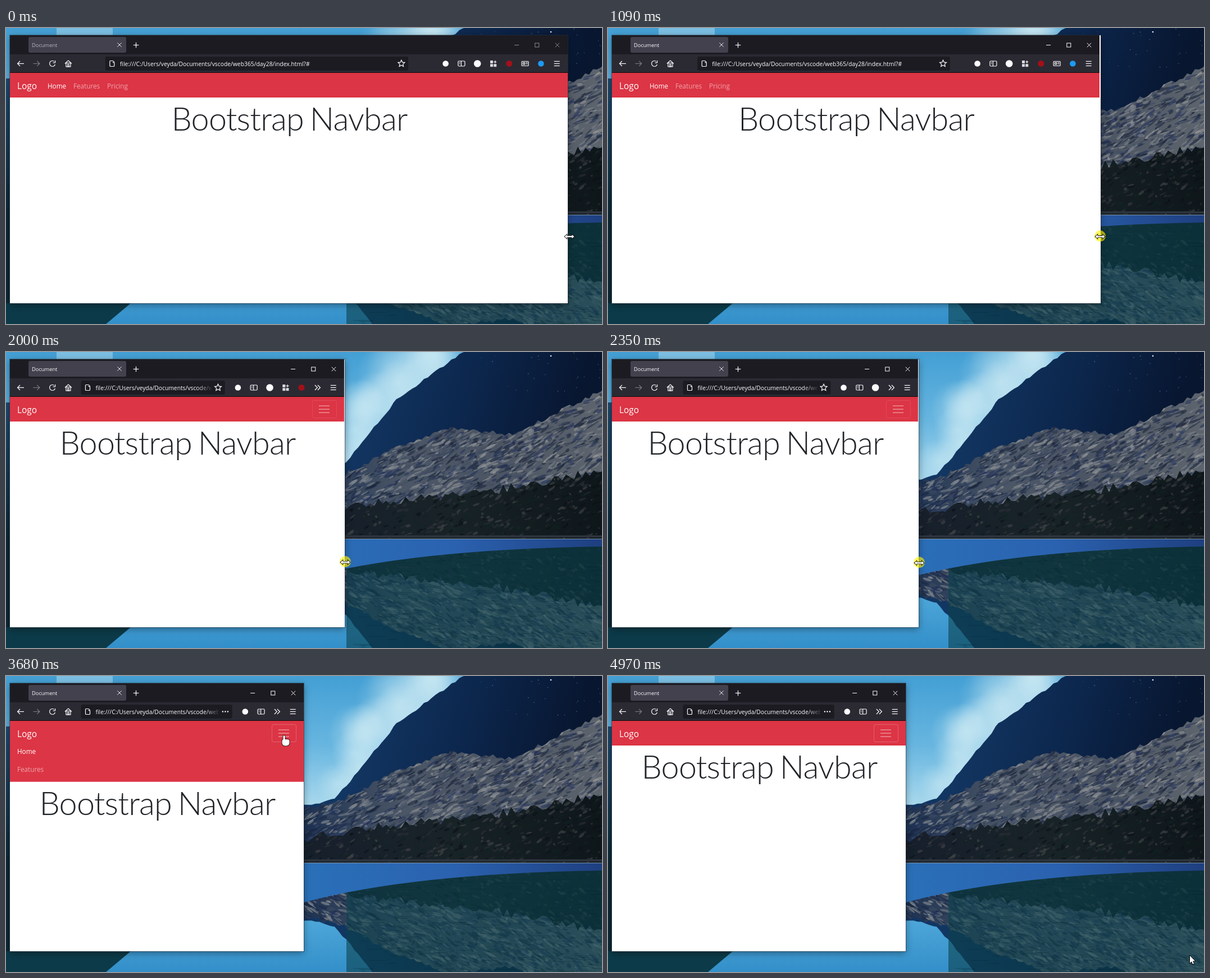
Write an HTML page with a canvas that moves like this. It is 1061 px wide and 528 px high and loops after 5.04 s.

```html
<!DOCTYPE html>
<html lang="en">
<head>
<meta charset="utf-8">
<title>Responsive navbar</title>
<style>
  html, body { margin: 0; width: 100%; height: 100%; overflow: hidden; background: #0b3340; }
  canvas { display: block; }
</style>
</head>
<body>
<canvas id="stage" width="1061" height="528"></canvas>
<script>
const W = 1061, H = 528, LOOP = 5040;
const LEFT = 7, TOP = 13, BOTTOM = 491, SHORE = 333, SLOT = 28.3;
const SANS = '"Open Sans", "Noto Sans", sans-serif';
const INK = '#fbfbfe';
const URL_TEXT = 'file:///C:/Users/veyda/Documents/vscode/web365/day28/index.html?#';
const stage = document.getElementById('stage').getContext('2d');
let g = stage;

// Drawing helpers
function rect(x, y, w, h, fill) { g.fillStyle = fill; g.fillRect(x, y, w, h); }
function line(x0, y0, x1, y1) { g.beginPath(); g.moveTo(x0, y0); g.lineTo(x1, y1); g.stroke(); }
function rows(x0, x1, ...ys) { for (const y of ys) line(x0, y, x1, y); }
function disc(x, y, r, fill) {
  g.beginPath(); g.arc(x, y, r, 0, 7); g.fillStyle = fill; g.fill();
}
function rounded(x, y, w, h, r, fill) {
  g.beginPath();
  g.roundRect(x, y, w, h, r);
  if (fill) { g.fillStyle = fill; g.fill(); } else g.stroke();
}
function chevron(x, dir, size = 4.5) {
  g.beginPath();
  g.moveTo(x - dir * size, -size);
  g.lineTo(x, 0);
  g.lineTo(x - dir * size, size);
  g.stroke();
}
function text(str, x, y, size, fill) {
  g.font = `${size}px ${SANS}`;
  g.textAlign = 'left';
  g.fillStyle = fill;
  g.fillText(str, x, y);
}
function blend(x0, y0, x1, y1, ...colors) {
  const grad = g.createLinearGradient(x0, y0, x1, y1);
  colors.forEach((c, i) => grad.addColorStop(i / (colors.length - 1), c));
  return grad;
}
function seeded(seed) {
  return () => (seed = (seed * 16807) % 2147483647) / 2147483647;
}
function clipped(path, paint) {
  g.save();
  g.clip(path);
  paint();
  g.restore();
}
function box(x, y, w, h) {
  const path = new Path2D();
  path.rect(x, y, w, h);
  return path;
}

// Wallpaper: a ragged ridge through a few key points, closed at the shore
function ridge(points, rough, rnd) {
  const path = new Path2D();
  path.moveTo(points[0][0], SHORE);
  for (let i = 0; i < points.length - 1; i++) {
    const [x0, y0] = points[i], [x1, y1] = points[i + 1];
    for (let x = x0; x < x1; x += 7) {
      path.lineTo(x, y0 + (y1 - y0) * (x - x0) / (x1 - x0) + (rnd() - 0.5) * rough);
    }
  }
  path.lineTo(W, points[points.length - 1][1]);
  path.lineTo(W, SHORE);
  return path;
}
function speckle(path, count, length, colors, rnd) {
  clipped(path, () => {
    g.globalAlpha = 0.55;
    for (let i = 0; i < count; i++) {
      g.beginPath();
      g.ellipse(530 + rnd() * 531, 60 + rnd() * 273, length * (0.2 + rnd()), 0.6 + rnd() * 2.2,
        -0.2 - rnd() * 0.6, 0, 7);
      g.fillStyle = colors[Math.floor(rnd() * colors.length)];
      g.fill();
    }
  });
}
function paintLand() {
  const rnd = seeded(71);
  g.fillStyle = blend(640, 60, 1000, 160, '#123662', '#0c264c', '#081630');
  g.fill(ridge([[530, 232], [585, 220], [695, 86], [812, 0], [W, -20]], 5, rnd));

  const slope = ridge([[530, 236], [596, 222], [705, 165], [790, 136], [905, 147], [W, 68]], 8, rnd);
  g.fillStyle = blend(530, 0, W, 0, '#1d3252', '#4b5666', '#4c5563', '#5d646d');
  g.fill(slope);
  speckle(slope, 3200, 10, ['#172238', '#1b2740', '#3f4b62', '#7d848c', '#9a9c9c', '#22305c'], rnd);

  const forest = ridge([[530, 290], [690, 265], [850, 250], [W, 212]], 16, rnd);
  g.fillStyle = blend(530, 0, W, 0, '#171f2c', '#182327', '#0e161a');
  g.fill(forest);
  speckle(forest, 1500, 6, ['#0a1016', '#16262a', '#2e3139', '#10241f', '#484a4c'], rnd);
  rect(530, SHORE - 6, W, 4, '#2c333c');
}
function paintWallpaper() {
  rect(0, 0, W, H, blend(0, 0, 0, 250, '#439fd4', '#68b6e0', '#b5dfef'));
  const rnd = seeded(12);
  for (let i = 0; i < 24; i++) {
    const x = 590 + rnd() * 190, y = 205 - (x - 560) * 0.75 + (rnd() - 0.5) * 130, r = 35 + rnd() * 50;
    const puff = g.createRadialGradient(x, y, 0, x, y, r);
    puff.addColorStop(0, 'rgba(208,236,244,.5)');
    puff.addColorStop(1, 'rgba(208,236,244,0)');
    rect(x - r, y - r, 2 * r, 2 * r, puff);
  }
  rect(90, 0, 100, 13, 'rgba(190,228,243,.45)');
  paintLand();
  for (let i = 0; i < 26; i++) disc(835 + rnd() * 226, rnd() * 70, 0.4 + rnd() * 0.4, 'rgba(165,190,230,.6)');
  disc(970, 7, 1.3, '#e5f4ff');
  rect(0, 90, 8, H, blend(0, 90, 0, SHORE, '#1d4a70', '#0c2835'));

  // The lake mirrors the land, tinted teal
  clipped(box(0, SHORE, W, H), () => {
    rect(8, SHORE, W, H, blend(0, SHORE, 0, H, '#2c6cb8', '#4fa8da', '#338fc9'));
    g.save();
    g.translate(0, 2 * SHORE);
    g.scale(1, -1);
    paintLand();
    g.restore();
    rect(606, SHORE, W, H, 'rgba(10,66,78,.6)');
    for (let i = 0; i < 260; i++) {
      rect(600 + rnd() * 461, 360 + rnd() * 168, 5 + rnd() * 30, 1, 'rgba(8,40,56,.35)');
    }
    g.fillStyle = blend(530, 0, W, 0, '#2a70b8', '#2b62b0', '#1e3f80');
    g.beginPath();
    g.moveTo(530, SHORE);
    g.lineTo(W, SHORE);
    g.lineTo(W, SHORE + 14);
    g.quadraticCurveTo(720, 352, 530, 404);
    g.fill();
    rect(530, SHORE - 1, W, 2, '#8095a4');
  });
  g.fillStyle = '#0c3a48';
  g.beginPath();
  g.moveTo(0, BOTTOM);
  g.lineTo(222, BOTTOM);
  g.lineTo(178, H);
  g.lineTo(0, H);
  g.fill();
}
const wallpaper = document.createElement('canvas');
wallpaper.width = W;
wallpaper.height = H;
g = wallpaper.getContext('2d');
paintWallpaper();
g = stage;

// Motion
const clamp = v => Math.min(1, Math.max(0, v));
const DRAG = [[400, 1000], [1090, 877], [1650, 676], [2350, 553], [2770, 530]];

// Smooth curve through the drag points, at rest on both ends
function edgeAt(t) {
  const last = DRAG.length - 1;
  const slope = i => i <= 0 || i >= last ? 0
    : (DRAG[i + 1][1] - DRAG[i - 1][1]) / (DRAG[i + 1][0] - DRAG[i - 1][0]);
  let i = 0;
  while (i < last - 1 && t >= DRAG[i + 1][0]) i++;
  const [t0, a] = DRAG[i], [t1, b] = DRAG[i + 1], span = t1 - t0, k = clamp((t - t0) / span);
  return a + (b - a) * k * k * (3 - 2 * k)
    + span * k * (1 - k) * (slope(i) * (1 - k) - slope(i + 1) * k);
}
// Decelerating hand movement with a slight sideways bow
function glide(k, x0, y0, x1, y1, bow) {
  const p = 1 - (1 - k) ** 2.3;
  return [x0 + (x1 - x0) * p + bow * Math.sin(Math.PI * k), y0 + (y1 - y0) * p];
}
function pointerAt(t, edge, lag) {
  if (t < 2770) return [edge + 3 - 2 * lag, 372 + 5 * ((1000 - edge) / 470) ** 3];
  if (t < 4500) return glide(clamp((t - 2770) / 560), 533, 377, 495, 106, -13);
  return glide(clamp((t - 4500) / 470), 495, 106, 1036, 499, 20);
}
// CSS "ease" timing
function ease(x) {
  const bez = (a, b, u) => 3 * a * u * (1 - u) ** 2 + 3 * b * u * u * (1 - u) + u ** 3;
  let lo = 0, hi = 1;
  for (let i = 0; i < 20; i++) {
    const mid = (lo + hi) / 2;
    if (bez(0.25, 0.25, mid) < clamp(x)) lo = mid; else hi = mid;
  }
  return bez(0.1, 1, lo);
}
// The picture advances every 70 ms; the second click shifts the beat
function tick(t) {
  const phase = t < 4480 ? 40 : 0;
  return phase + 70 * Math.floor((t - phase) / 70);
}

// Toolbar icons, centred on the origin
const icons = {
  back() { rows(-5, 6, 0); chevron(-5.5, -1); },
  forward() { rows(-6, 5, 0); chevron(5.5, 1); },
  reload() {
    g.beginPath(); g.arc(0, 0, 5, 0.3, 5.4); g.stroke();
    line(5, -5.5, 5, -1.5); line(5, -1.5, 1, -1.5);
  },
  home() {
    line(-6, 0, 0, -5.5); line(0, -5.5, 6, 0);
    g.strokeRect(-4, -1, 8, 6.5); g.strokeRect(-1.2, 1.5, 2.4, 4);
  },
  page() { rounded(-4, -5, 8, 10, [1, 4, 1, 1]); rows(1, 4, -2); },
  star() {
    g.beginPath();
    for (let i = 0; i < 10; i++) {
      const r = i % 2 ? 3 : 6.3, a = i * Math.PI / 5;
      g.lineTo(r * Math.sin(a), -r * Math.cos(a));
    }
    g.closePath(); g.stroke();
  },
  dots() { for (const x of [-4.5, 0, 4.5]) disc(x, 0, 1.2, INK); },
  save() { disc(0, 0, 5.3, INK); },
  sidebar() { rounded(-6, -4.5, 12, 9, 1.5); line(-0.5, -4.5, -0.5, 4.5); rows(-4, -2.5, -2, 0.3); },
  account() { disc(0, 0, 6.3, INK); },
  grid() {
    for (const [x, y] of [[-5.5, -5.5], [-5.5, 0.7], [0.7, 0.7]]) rect(x, y, 5, 5, '#d8d8de');
    rows(0.8, 5.8, -3); line(3.3, -5.5, 3.3, -0.5);
  },
  shield() { disc(0, 0, 5.5, '#a3101a'); },
  news() { rounded(-6, -4, 12, 8, 1); g.strokeRect(-3.5, -1.8, 3, 3.2); rows(1.5, 4.3, -1.8, 0.5); },
  blue() { disc(0, 0, 5.3, '#1d9bf0'); },
  more() { chevron(0, 1); chevron(5, 1); },
  menu() { rows(-5, 5, -4, 0, 4); },
  plus() { rows(-4.8, 4.8, 0); line(0, -4.8, 0, 4.8); },
  minimize() { rows(-4, 4, 0); },
  maximize() { g.strokeRect(-3.5, -3.5, 7, 7); },
  close() { line(-3.7, -3.7, 3.7, 3.7); line(3.7, -3.7, -3.7, 3.7); }
};
function icon(name, x, y, alpha = 1, weight = 1.2) {
  g.save();
  g.translate(x, y);
  g.globalAlpha = alpha;
  g.strokeStyle = INK;
  g.lineWidth = weight;
  icons[name]();
  g.restore();
}
const EXTRAS = ['save', 'sidebar', 'account', 'grid', 'shield', 'news', 'blue'];

function drawChrome(right, focused) {
  rect(LEFT, TOP, right - LEFT, 34, '#1c1b22');
  rect(LEFT, 47, right - LEFT, 32, '#2b2a33');
  rect(LEFT, 79, right - LEFT, 1, '#0c0c0d');
  rounded(40, 16, 174, 28, 3, '#42414d');
  text('Document', 46, 34, 9.3, focused ? INK : '#b5b4bd');
  icon('close', 202, 30, 0.9, 1);
  icon('plus', 231.5, 30.5);
  ['close', 'maximize', 'minimize'].forEach((name, i) =>
    icon(name, right - 18.5 - 36.2 * i, 30.5, focused ? 1 : 0.5, 1));
  ['back', 'forward', 'reload', 'home'].forEach((name, i) =>
    icon(name, 26 + SLOT * i, 63.5, name === 'forward' ? 0.35 : 1));

  // Extensions collapse into the overflow chevron as the address bar gets tight
  let slots = 8;
  while (slots > 4 && right - 369 + (8 - slots) * SLOT < 252) slots--;
  const spacer = slots < 8 ? 2.5 : Math.max(0, (right - 675) * 0.141);
  const barL = 131 + spacer, barR = right - 238 - spacer + (8 - slots) * SLOT;
  rounded(barL, 51, barR - barL, 25, 3, '#1c1b22');
  icon('page', barL + 12, 63.5);
  const textEnd = barR - 24;
  clipped(box(barL, 51, textEnd - barL, 25), () =>
    text(URL_TEXT, barL + 26, 67.5, 10.33, blend(textEnd - 26, 0, textEnd, 0, INK, 'rgba(251,251,254,.1)')));
  icon(slots > 4 ? 'star' : 'dots', barR - 12.3, 63.5);

  const row = slots === 8 ? [...EXTRAS, 'menu'] : [...EXTRAS.slice(0, slots - 2), 'more', 'menu'];
  row.forEach((name, i) => icon(name, right - 19.3 - (slots - 1 - i) * SLOT, 63.5));
}

function drawPage(right, open, ringed) {
  const drop = 95 * open, muted = 'rgba(255,255,255,.55)';
  rect(LEFT, 80, right - LEFT, 44 + drop, '#dc3545');
  text('Logo', 20, 109, 15.4, '#fff');
  if (right >= 801) {
    text('Home', 74, 108, 11.7, '#fff');
    text('Features', 120, 108, 11.7, muted);
    text('Pricing', 180, 108, 11.7, muted);
  } else {
    g.strokeStyle = `rgba(255,255,255,${ringed ? 0.22 : 0.1})`;
    g.lineWidth = 1;
    rounded(right - 56.5, 86.5, 43, 31, 3);
    for (const y of [96, 102, 108]) rect(right - 45, y - 0.5, 19, 1.2, muted);
    clipped(box(LEFT, 118, right - LEFT, drop + 6), () =>
      ['Home', 'Features', 'Pricing'].forEach((label, i) => {
        if (open) text(label, 20, 139 + i * 31.7, 11.7, i ? muted : '#fff');
      }));
    rect(LEFT, 124 + drop, right - LEFT, BOTTOM - 124 - drop, '#fff');
  }
  g.font = '300 57.5px Lato, "Open Sans", sans-serif';
  g.letterSpacing = '-0.8px';
  g.wordSpacing = '-4px';
  g.textAlign = 'center';
  g.fillStyle = '#212529';
  g.fillText('Bootstrap Navbar', (LEFT + right) / 2 + 1, 183 + drop);
  g.letterSpacing = g.wordSpacing = '0px';
}

const pointers = {
  resize(path) {
    for (const dir of [-1, 1]) {
      path.lineTo(dir * 4.5, dir * -1.2);
      path.lineTo(dir * 4.5, dir * -3.5);
      path.lineTo(dir * 8.5, 0);
      path.lineTo(dir * 4.5, dir * 3.5);
      path.lineTo(dir * 4.5, dir * 1.2);
    }
    path.closePath();
  },
  arrow(path) {
    for (const [x, y] of [[0, 0], [0, 13], [3, 10.3], [5, 15], [7, 14], [5, 9.5], [9, 9.2]]) path.lineTo(x, y);
    path.closePath();
  },
  hand(path) {
    path.roundRect(-1.5, 0, 3.2, 13, 1.6);
    path.roundRect(-3.5, 7, 13, 11.5, [3, 3, 5, 5]);
  }
};
function drawPointer(x, y, edge, pressed) {
  if (pressed) disc(x, y - 1, 10, 'rgba(255,240,0,.62)');
  const overToggler = x > edge - 57 && x < edge - 13 && y > 86 && y < 118;
  const kind = overToggler ? 'hand' : Math.abs(x - edge) < 10 && y > 300 ? 'resize' : 'arrow';
  const path = new Path2D();
  pointers[kind](path);
  g.save();
  g.translate(x, y);
  g.strokeStyle = '#000';
  g.lineWidth = 1.6;
  g.stroke(path);
  g.fillStyle = '#fff';
  g.fill(path);
  g.restore();
}

function draw(time) {
  const t = tick(time);
  const edge = Math.round(edgeAt(t));
  const lag = Math.round((edgeAt(t - 35) - edgeAt(t + 35)) / 9);
  const right = edge - lag;
  const open = ease((t - 3540) / 350) - ease((t - 4480) / 350);
  const [x, y] = pointerAt(t, edge, lag);
  const during = (from, to) => time >= from && time < to;
  const pressed = during(400, 2770) || during(3440, 3540) || during(4350, 4480);

  g.drawImage(wallpaper, 0, 0);
  g.save();
  g.shadowColor = 'rgba(0,0,0,.4)';
  g.shadowBlur = 12;
  g.shadowOffsetY = 3;
  rect(LEFT, TOP, edge - LEFT, BOTTOM - TOP, '#fff');
  g.restore();
  drawChrome(right, time >= 400);
  drawPage(right, open, time >= 3440);
  g.strokeStyle = 'rgba(40,50,60,.55)';
  g.lineWidth = 1;
  g.strokeRect(LEFT - 0.5, TOP - 0.5, edge - LEFT + 1, BOTTOM - TOP + 1);
  drawPointer(x, y, edge, pressed);
}

function loop(now) {
  draw(now % LOOP);
  requestAnimationFrame(loop);
}
requestAnimationFrame(loop);
</script>
</body>
</html>
```
